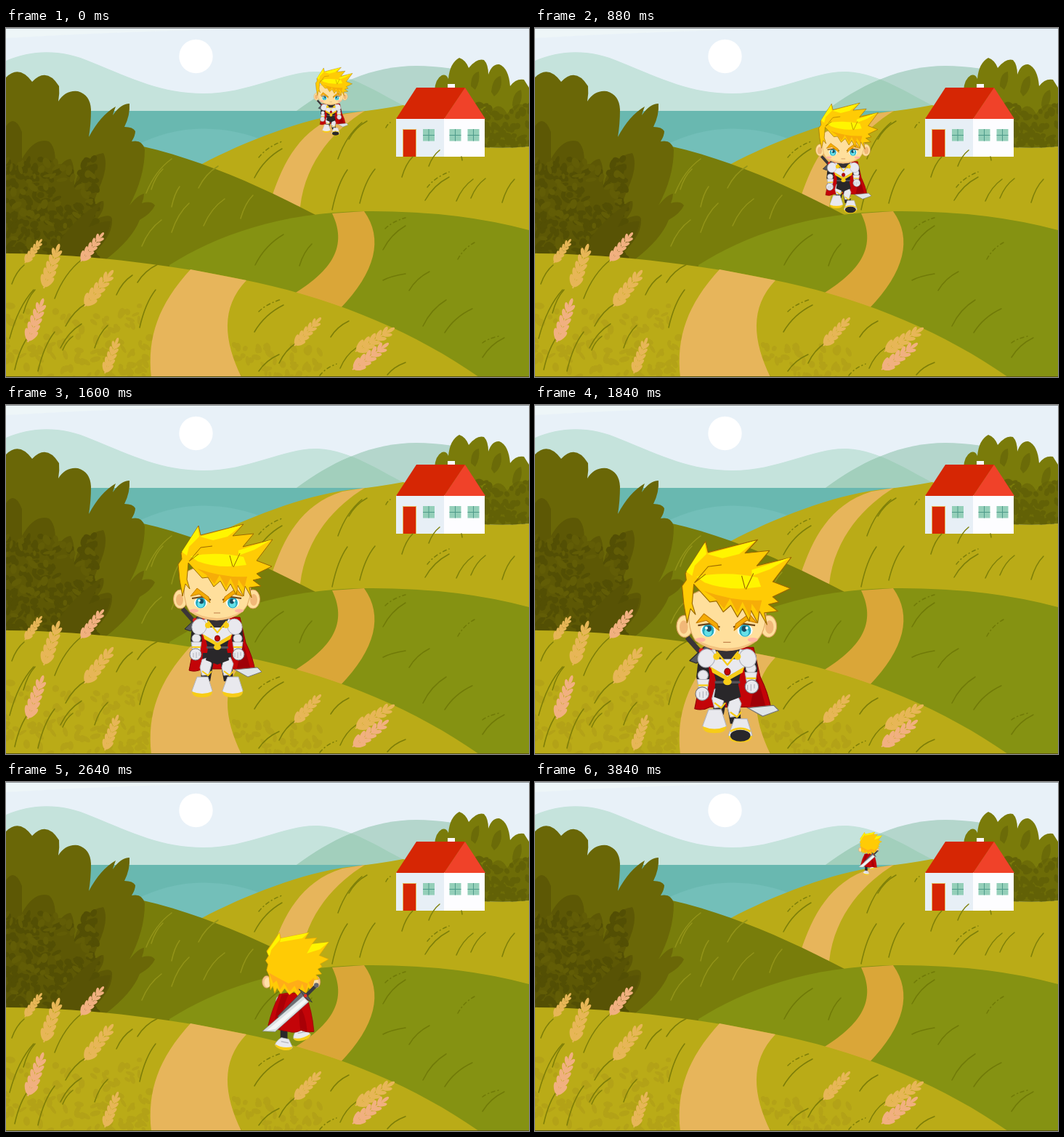
Animation of 720x480 px, one loop 3.92 s. Source, as an HTML page with a canvas:

```html
<!DOCTYPE html>
<html>
<head>
<meta charset="utf-8">
<style>
html, body { margin: 0; width: 100%; height: 100%; overflow: hidden; background: #e8f1f8; }
canvas { display: block; }
</style>
</head>
<body>
<canvas id="stage" width="720" height="480"></canvas>
<script>
const stage = document.getElementById('stage').getContext('2d');
const scenery = document.createElement('canvas');
scenery.width = 720;
scenery.height = 480;
let g = scenery.getContext('2d');

const STEP = 80, FRAMES = 49, TURN = 1920;

function shape(d, fill, line, width = 1) {
  const p = new Path2D(d);
  if (fill) { g.fillStyle = fill; g.fill(p); }
  if (line) { g.strokeStyle = line; g.lineWidth = width; g.stroke(p); }
  return p;
}
function oval(x, y, rx, ry, fill, turn = 0, line) {
  g.beginPath();
  g.ellipse(x, y, rx, ry, turn, 0, 7);
  g.fillStyle = fill;
  g.fill();
  if (line) { g.strokeStyle = line; g.lineWidth = 1; g.stroke(); }
}
function rect(x, y, w, h, fill) {
  g.fillStyle = fill;
  g.fillRect(x, y, w, h);
}
function within(path, draw) {
  g.save();
  g.clip(path);
  draw();
  g.restore();
}
function randomizer(seed) {
  return () => (seed = (seed * 16807) % 2147483647) / 2147483647;
}
function mottle(seed, count, x, y, w, h, color) {
  const rnd = randomizer(seed);
  for (let i = 0; i < count; i++) {
    oval(x + w * rnd(), y + h * rnd(), 3 + 5 * rnd(), 2 + 3 * rnd(), color, 3 * rnd());
  }
}

// Blades are given as root x, root y, tip x, tip y.
function blades(list, color, dash = []) {
  g.strokeStyle = color;
  g.lineWidth = 1.5;
  g.lineCap = 'round';
  g.setLineDash(dash);
  for (let i = 0; i < list.length; i += 4) {
    const [x, y, u, v] = list.slice(i, i + 4);
    g.beginPath();
    g.moveTo(x, y);
    g.quadraticCurveTo(x + (u - x) * .35, y + (v - y) * .65, u, v);
    g.stroke();
  }
  g.setLineDash([]);
}
function wheat(x, y, tipX, tipY, color) {
  const len = Math.hypot(tipX - x, tipY - y);
  g.save();
  g.translate(x, y);
  g.rotate(Math.atan2(tipY - y, tipX - x));
  rect(0, -1, len * .9, 2, color);
  for (let i = 0; i < 5; i++) {
    const at = len * (.16 + i * .16), size = len * (.14 - i * .008);
    oval(at, -size * .48, size, size * .4, color, -.5);
    oval(at, size * .48, size, size * .4, color, .5);
  }
  oval(len * .92, 0, len * .1, len * .04, color);
  g.restore();
}

function paintDistance() {
  rect(0, 0, 720, 480, '#e8f1f8');
  shape('M0 0H420Q200 2 0 14Z', '#eef6f8');
  oval(261.5, 39, 23.2, 23.2, '#fff');
  const far = shape('M0 45C35 30 75 28 118 47C175 70 215 90 272 90C335 90 385 58 430 60C475 63 510 88 550 108V120H0Z', '#c5e3dc');
  const near = shape('M400 114C450 77 505 52 565 52Q610 52 660 66L720 90V120H400Z', '#b4d6cc');
  within(far, () => { g.fillStyle = '#a2cfbc'; g.fill(near); });
  rect(0, 114, 560, 90, '#69b8b0');
  shape('M175 163Q225 138 272 138.5Q320 139 360 157L270 190Z', '#73bfb9');
}

function paintRightTree() {
  const tree = shape('M590 86Q591 70 600 65Q606 63 609 70Q611 48 624 41Q633 44 637 55Q648 41 658 44Q664 50 664 64Q669 49 679 50Q692 55 694 80Q702 69 713 71L720 82V163Q690 166 658 164L590 130Z', '#7a7b0a');
  within(tree, () => {
    mottle(41, 80, 650, 104, 75, 60, '#636207');
    shape('M640 80Q640 62 651 60Q653 74 646 85ZM668 88Q670 68 681 66Q685 84 672 94ZM697 106Q698 88 709 85Q713 102 700 114Z', '#6b6b08');
    g.globalAlpha = .55;
    shape('M658 130Q676 92 690 118Q705 95 720 112V170H650Z', '#636207');
    g.globalAlpha = 1;
  });
}

function paintHouse() {
  rect(608, 77, 10, 9, '#fafcff');
  rect(537, 124, 66, 53, '#e7eff6');
  rect(603, 124, 56, 53, '#fdfdff');
  shape('M565 82H632L603 125H537Z', '#d62604');
  shape('M632 82L660 125H603Z', '#f04229');
  rect(546, 139, 19, 38, '#e5b75e');
  rect(547, 140, 17, 37, '#d62604');
  for (const x of [574, 610.5, 635.5]) {
    rect(x, 139, 16, 16.5, '#94cfb9');
    rect(x + 7.5, 139, 1, 16.5, '#4f9b8a');
    rect(x, 147, 16, 1, '#4f9b8a');
  }
}

function paintBush() {
  const bush = shape('M0 68Q18 50 36 74Q56 53 73 80Q74 90 72 101Q82 85 99 87Q116 92 117 112Q117 132 114 150Q130 120 151 108Q148 116 147 120Q158 104 170 104Q171 120 163 136Q175 136 178 142Q178 148 173 156Q188 153 191 167Q191 205 170 244Q182 229 190 228Q190 234 187 241Q200 237 205 244Q200 255 184 264Q174 290 138 318H0Z', '#6a6707');
  within(bush, () => {
    shape('M0 135Q12 118 22 143V180Q39 150 59 156Q71 165 67 202Q77 181 89 180Q95 189 94 217Q105 176 134 172Q143 190 126 225Q118 248 114 255Q124 238 134 238Q137 248 126 262Q145 254 146 263Q148 288 110 320H0Z', '#5d5805');
    mottle(17, 210, 0, 180, 125, 140, '#534f04');
    mottle(99, 55, 0, 180, 120, 140, '#625d06');
    shape('M60 320Q80 270 132 238Q121 260 114 274Q135 264 144 266Q142 290 108 320Z', '#585305');
  });
}

function paintFields() {
  shape('M268 188C330 155 410 125 470 117Q510 113 547 106L610 130L658 164Q690 166 720 163V300H268Z', '#baab17');
  paintRightTree();
  shape('M494 114C455 138 413 180 405 246L366 232C382 185 405 137 463 119Z', '#e7b55b');
  blades([342, 206, 380, 166, 457, 180, 490, 130, 472, 153, 497, 128, 449, 250, 470, 195,
    487, 241, 508, 194, 577, 237, 610, 205, 620, 238, 643, 208, 640, 234, 660, 207,
    683, 240, 700, 208], '#7d7f09');
  blades([348, 178, 380, 156, 580, 219, 610, 198, 523, 137, 529, 130], '#7d7f09', [5, 4, 1, 4]);
  paintHouse();
  blades([545, 205, 560, 177, 582, 190, 597, 168, 628, 182, 627, 177], '#7d7f09');

  shape('M100 148C220 160 320 202 428 258V345H100Z', '#787d0b');
  blades([193, 227, 228, 180, 200, 222, 216, 194, 265, 220, 292, 190, 228, 281, 252, 241,
    228, 246, 239, 218, 272, 272, 301, 235, 323, 262, 340, 230, 187, 300, 214, 264], '#939419');

  shape('M225 326C290 285 380 253 495 252Q620 251 720 278V480H225Z', '#859212');
  shape('M449 255L493 252C520 290 509 335 460 386L396 366C442 337 473 305 449 255Z', '#daa638');
  blades([343, 326, 382, 284, 404, 327, 421, 297, 519, 305, 550, 272, 519, 347, 550, 338,
    555, 361, 583, 335, 574, 410, 606, 374, 604, 419, 642, 386, 656, 453, 686, 426], '#707a08');
  blades([522, 276, 550, 261, 622, 318, 645, 295, 656, 433, 678, 424], '#707a08', [5, 4, 1, 4]);
}

function paintForeground() {
  const hill = shape('M0 310C120 311 245 328 345 350C460 375 565 420 651 480H0Z', '#baab17');
  within(hill, () => {
    mottle(7, 120, -5, 382, 205, 100, '#b3a217');
    mottle(23, 50, 315, 435, 120, 50, '#b3a217');
  });
  shape('M254 332L331 347C295 385 300 430 324 480H200C194 425 210 380 254 332Z', '#e7b55b');
  blades([8, 352, 25, 326, 24, 392, 40, 360, 5, 427, 38, 360, 12, 470, 31, 424, 44, 472, 67, 418,
    67, 372, 105, 318, 75, 440, 104, 407, 78, 443, 92, 424, 122, 440, 140, 409, 82, 410, 112, 378,
    152, 367, 174, 340, 181, 350, 209, 325, 184, 412, 206, 360, 342, 418, 382, 381,
    376, 461, 400, 433, 447, 425, 472, 403, 348, 472, 376, 449, 460, 468, 482, 440,
    525, 477, 550, 460], '#7c7d08');
  blades([348, 390, 380, 373, 432, 478, 455, 462], '#7c7d08', [5, 4, 1, 4]);

  const gold = '#e7b657', pink = '#f1b080';
  wheat(26, 323, 49, 291, gold);
  wheat(52, 358, 73, 298, gold);
  wheat(103, 321, 134, 282, pink);
  wheat(30, 432, 51, 373, pink);
  wheat(108, 383, 147, 334, gold);
  wheat(136, 475, 154, 427, gold);
  wheat(397, 437, 433, 399, gold);
  wheat(481, 445, 534, 413, gold);
  wheat(477, 470, 526, 434, pink);
}

function paintScenery() {
  paintDistance();
  paintFields();
  paintBush();
  paintForeground();
  rect(0, 0, 720, 1, '#8b9194');
  rect(0, 479, 720, 1, '#5d5712');
}

const STEEL = '#e9e9ee', SHADE = '#b3b4bc', DARK = '#29272a', TRIM = '#f7cc17',
  SKIN = '#ffdf9c', HAIR = '#ffcb05', SHINE = '#fff500', RED = '#c30408', EDGE = '#9b6900';

// Positive stride moves the leg toward the viewer.
function frontLeg(x, side, stride) {
  const drop = Math.max(-8, Math.min(3, stride * 7)), inward = Math.abs(stride) * 4 * side;
  g.save();
  g.translate(-inward, drop);
  shape(`M${x - 9} 341H${x + 8}L${x + 6 + side * 5} 380H${x - 7 + side * 5}Z`, DARK);
  shape(`M${x - 6 + side * 4} 350l9 -3l4 9l-4 15l-9 1l-3 -11Z`, STEEL, SHADE);
  shape(`M${x - 6 + side * 4} 366l8 6l5 -6`, null, TRIM, 2);
  const footX = x + side * 10;
  shape(`M${footX - 7} 374H${footX + 8}L${footX + 14} 393Q${footX + 14} 399 ${footX} 399Q${footX - 14} 399 ${footX - 14} 393Z`, STEEL, SHADE);
  shape(`M${footX - 14} 394Q${footX} 400 ${footX + 14} 394Q${footX + 14} 402 ${footX} 402Q${footX - 14} 402 ${footX - 14} 394Z`, TRIM);
  if (stride > .3) {
    oval(footX, 394, 12, 7, DARK);
    shape(`M${footX - 12} 389Q${footX} 382 ${footX + 12} 389`, null, TRIM, 2.5);
  }
  g.restore();
}

function frontArm(x, side, swing) {
  g.save();
  g.translate(0, swing * 3);
  shape(`M${x - 6} 305h12l2 18l-3 13h-10l-3 -13Z`, DARK);
  oval(x, 321, 6, 6, STEEL, 0, SHADE);
  shape(`M${x - 7} 326h14l-2 12h-10Z`, STEEL, SHADE);
  rect(x - 6, 332, 12, 2, TRIM);
  oval(x + side, 343, 8, 8, STEEL, 0, '#77777e');
  shape(`M${x - 4} 341v6m4 -7v8m4 -8v5`, null, SHADE);
  g.restore();
  oval(x - side * 4, 305, 10, 11, STEEL, side * -.4, SHADE);
}

function frontHead() {
  for (const side of [-1, 1]) {
    oval(290 + side * 50, 267, 9.5, 13, SKIN, 0, '#d79b5b');
    oval(290 + side * 51, 268, 5, 8, '#f1b878');
  }
  shape('M247 230Q290 207 336 235Q340 270 326 284Q312 295 290 296Q267 295 253 284Q241 268 247 230Z', SKIN, '#e0a963');
  shape('M252 281Q270 293 290 293Q313 293 328 280Q314 296 290 296Q266 296 252 281Z', '#f3c27f');
  for (const side of [-1, 1]) {
    g.save();
    g.translate(290, 0);
    g.scale(side, 1);
    oval(22, 272, 9, 7.5, '#f6ffff');
    oval(22, 272, 7, 7.5, '#25a9c0');
    oval(22, 274, 4.5, 4.5, '#65e0e7');
    oval(21, 270, 3, 3.5, '#194c61');
    oval(24, 269, 1.7, 1.7, '#fff');
    shape('M8 268L20 264L34 266', null, '#6d4517', 2);
    shape('M9 272L11 264L27 252L36 263L24 260Z', '#f4ab04', '#c77d00');
    oval(31, 283, 6, 2.5, '#ffb4a0');
    g.restore();
  }
  shape('M286 286H295', null, '#bd7d48');
  shape('M243 263L239 240L237 219L242 212L241 204L265 166L268 179L327 164L312 180L341 177L326 195L367 185L345 214L366 222L345 232L352 238L340 241L351 249L335 251L338 265L329 249L327 263L319 248L317 261L309 246L303 256L295 242L286 250L278 237L270 238L251 217L249 240L253 253L247 246Z', HAIR, EDGE);
  shape('M242 202L264 168L266 181L252 195L249 207ZM267 181L325 165L305 181L285 186ZM320 200L366 185L342 199L320 207Z', SHINE);
  shape('M254 208Q290 201 327 209L331 220Q293 226 264 215Z', SHINE);
  shape('M308 207l4 15M265 205L252 215L268 196L284 194M322 204L313 223', null, EDGE);
  shape('M275 233L287 246L294 234L303 251L309 238L318 257L320 240L328 252L332 236Q300 238 263 225Z', '#f6ad08');
}

function heroFront(stride) {
  g.translate(-290, -402);
  shape('M262 292H322L330 327Q340 347 343 366Q326 370 314 363H270Q261 368 252 365Q260 330 262 292Z', RED, '#8e0007');
  shape('M326 325L337 364L318 362Z', '#9f0008');
  shape('M315 364L346 361L352 367L333 374Z', '#dfe5e8', '#777');
  shape('M243 280L266 306', null, '#3b3537', 6);
  shape('M246 308L266 289L271 296L254 311Z', '#55575d', DARK);
  oval(260, 296, 3, 3, '#e12121');
  frontLeg(280, -1, -stride);
  frontLeg(302, 1, stride);
  shape('M272 310H309L304 336L307 351L291 357L275 351L278 335Z', DARK);
  shape('M267 297Q291 288 315 297L311 316L291 327L271 316Z', STEEL, SHADE);
  shape('M271 315L291 327L311 315L309 322L291 332L273 322Z', TRIM);
  shape('M276 294H306L301 306H281Z', '#343034');
  shape('M278 297L291 313L304 297', null, TRIM, 2);
  oval(291, 321, 3.5, 4, RED, 0, '#77050c');
  rect(276, 332, 30, 3, '#555057');
  oval(291, 333, 5, 4, TRIM);
  frontArm(262, -1, stride);
  frontArm(319, 1, -stride);
  oval(278, 303, 4, 4, TRIM);
  oval(303, 303, 4, 4, TRIM);
  frontHead();
}

function backLeg(x, stride) {
  const y = stride * 14;
  shape(`M${x - 7} 390h15v${30 + y}h-15Z`, DARK);
  g.save();
  g.translate(x, 425 + y);
  g.rotate(x < 270 ? .2 : -.2);
  shape('M-7 -10H9L20 5Q20 12 5 12Q-17 12 -17 7Q-17 0 -7 -10Z', STEEL, SHADE);
  shape('M-17 6Q0 13 20 4Q20 14 2 15Q-16 15 -17 6Z', TRIM);
  shape('M-6 -2H10', null, SHADE, 2);
  g.restore();
}

function heroBack(stride) {
  g.translate(-272, -445);
  backLeg(256, stride);
  backLeg(292, -stride);
  oval(247, 344, 7, 9, STEEL, .3, SHADE);
  shape('M247 332Q274 326 302 333Q316 365 320 411Q306 414 293 408Q280 415 268 411Q245 409 223 398Q232 361 247 332Z', RED, '#8e0007');
  shape('M252 333Q238 370 235 402L249 407Q251 365 266 332ZM286 350Q303 373 306 412L291 408Z', '#a90006');
  for (const side of [-1, 1]) {
    oval(272 + side * 52, 306, 9.5, 13, '#f4c48c', 0, '#c98d53');
    oval(272 + side * 50, 307, 7, 10, '#ffe0a8');
  }
  shape('M247 202L250 214L309 202L301 215L326 213L315 227L351 222L331 250L351 258L333 268L337 274L328 279L336 289L324 291L330 300L320 302L315 324L308 318L301 336L294 323L286 335L278 326L268 333L258 320L250 331L242 319L237 330L233 315L228 323L225 292L220 281L223 269L218 261L224 251L220 241Z', HAIR, '#e4a600');
  shape('M221 243L247 203L248 217L230 238L226 252ZM250 214L309 202L295 214L248 222ZM316 226L351 222L333 237L305 246Z', SHINE);
  shape('M225 287L234 309L241 303L248 323L257 309L268 327L279 314L287 330L295 310L302 329L308 306L315 323L321 296L306 309L286 302L266 309L243 297Z', '#ffad18');
  shape('M243 379L294 327L304 335L249 382Z', '#6b6e74', '#404046');
  shape('M297 336L309 348L238 411L211 410Z', '#d9e0e2', '#777c80');
  shape('M300 342L305 347L239 405L220 409Z', '#f4f7f7');
  shape('M300 338L325 313', null, '#39383c', 7);
  shape('M288 321L304 331L316 349L303 341Z', '#56575e', DARK);
  oval(325, 313, 5, 5, '#66666c');
  oval(302, 335, 3.5, 3.5, '#e03025');
}

// Keys: time, x and y of the feet, scale.
const approach = [
  [0, 447, 147, .39], [560, 410, 211, .504], [880, 424, 253, .63],
  [1200, 460, 305, .794], [1400, 388, 353, .9], [1600, 290, 402, 1], [1920, 258, 480, 1.21]
];
const retreat = [
  [1920, 258, 480, 1.22], [2160, 272, 445, 1], [2480, 345, 395, .755], [2800, 438, 335, .56],
  [3000, 464, 298, .47], [3200, 449, 265, .395], [3520, 414, 198, .302], [3840, 459.5, 125, .23]
];

function slope(keys, i, k) {
  const a = keys[Math.max(0, i - 1)], b = keys[Math.min(keys.length - 1, i + 1)];
  return (b[k] - a[k]) / (b[0] - a[0]);
}
function sample(keys, t) {
  let i = 0;
  while (i < keys.length - 2 && t > keys[i + 1][0]) i++;
  const a = keys[i], b = keys[i + 1], span = b[0] - a[0], u = (t - a[0]) / span;
  const ease = u * u * (3 - 2 * u);
  return [1, 2, 3].map(k => a[k] + (b[k] - a[k]) * ease +
    span * u * (1 - u) * ((1 - u) * slope(keys, i, k) - u * slope(keys, i + 1, k)));
}

function draw(now) {
  const t = Math.floor(now / STEP) % FRAMES * STEP;
  const away = t >= TURN;
  const [x, y, size] = sample(away ? retreat : approach, t);
  const stride = 1.4 * Math.cos(2 * Math.PI * (t / 960 - .917));
  g.drawImage(scenery, 0, 0);
  g.save();
  g.translate(x, y);
  g.scale(size, size);
  (away ? heroBack : heroFront)(stride);
  g.restore();
}

paintScenery();
g = stage;
g.lineJoin = 'round';
const start = performance.now();
function tick() {
  draw(performance.now() - start);
  requestAnimationFrame(tick);
}
tick();
</script>
</body>
</html>
```
